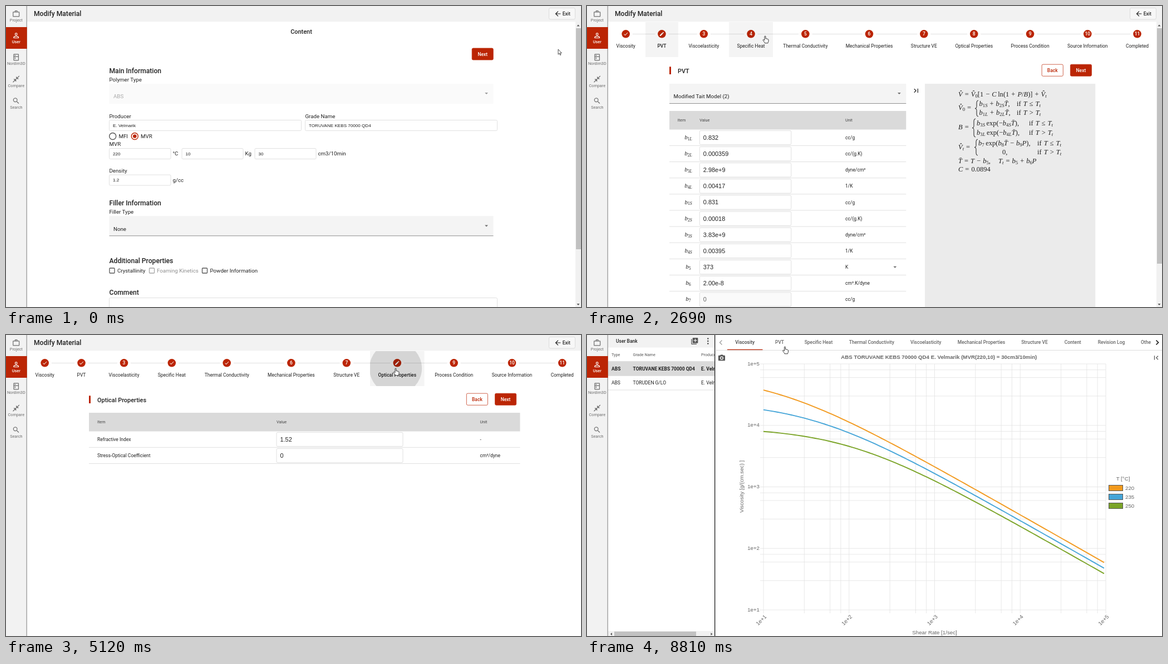
An HTML page for the animation above (8.89 s loop, 1033x542 px).

```html
<!DOCTYPE html>
<html lang="en">
<head>
<meta charset="utf-8">
<title>Modify Material</title>
<style>
html, body { margin: 0; width: 100%; height: 100%; overflow: hidden; background: #fff; }
svg { display: block; width: 1033px; height: 542px; }
text { font-family: Roboto, sans-serif; white-space: pre; }
.in { font-family: "Liberation Sans", Arial, sans-serif; }
.math { font-family: "Liberation Serif", "Noto Serif", serif; word-spacing: .9px; }
.i { font-style: italic; }
</style>
</head>
<body>
<svg id="stage" viewBox="0 0 1033 542"></svg>
<script>
const LOOP = 8890, RED = '#bb2504', INK = '#212121';
const GRADE = 'TORUVANE KEBS 70000 QD4', GRADE2 = 'TORUDEN G/LO', MAKER = 'E. Velmarik', DB = 'Other Material Database (Quolen 5.0)';

// the page is shown at this zoom; sizes below are page pixels times it
const Z = .607, F12 = 12 * Z, F14 = 14 * Z, F16 = 16 * Z, F18 = 18 * Z, F20 = 20 * Z;

const ICON = {
  work: 'M14 6V4h-4v2zM4 8v11h16V8zm16-2a2 2 0 0 1 2 2v11a2 2 0 0 1-2 2H4a2 2 0 0 1-2-2V8a2 2 0 0 1 2-2h4V4a2 2 0 0 1 2-2h4a2 2 0 0 1 2 2v2z',
  user: 'M12 5.9a2.1 2.1 0 1 1 0 4.2 2.1 2.1 0 0 1 0-4.2m0 9c2.97 0 6.1 1.46 6.1 2.1v1.1H5.9V17c0-.64 3.13-2.1 6.1-2.1M12 4a4 4 0 1 0 0 8 4 4 0 0 0 0-8zm0 9c-2.67 0-8 1.34-8 4v3h16v-3c0-2.66-5.33-4-8-4z',
  unit: 'M18 2H6a2 2 0 0 0-2 2v16a2 2 0 0 0 2 2h12a2 2 0 0 0 2-2V4a2 2 0 0 0-2-2zm0 18H6v-9h12zm0-11H6V4h12zM8 5h2v3H8zm0 7h2v5H8z',
  merge: 'M22 3.41 16.71 8.7 20 12h-8V4l3.29 3.29L20.59 2zM3.41 22l5.29-5.29L12 20v-8H4l3.29 3.29L2 20.59z',
  search: 'M15.5 14h-.79l-.28-.27A6.5 6.5 0 1 0 9.5 16c1.61 0 3.09-.59 4.23-1.57l.27.28v.79l5 5L20.5 19zm-6 0a4.5 4.5 0 1 1 0-9 4.5 4.5 0 0 1 0 9z',
  check: 'M9 16.2L4.8 12l-1.4 1.4L9 19 21 7l-1.4-1.4z',
  edit: 'M3 17.25V21h3.75L17.81 9.94l-3.75-3.75zM20.71 7.04a1 1 0 0 0 0-1.41l-2.34-2.34a1 1 0 0 0-1.41 0l-1.83 1.83 3.75 3.75z',
  back: 'M20 11H7.83l5.59-5.59L12 4l-8 8 8 8 1.41-1.41L7.83 13H20z',
  last: 'M5.59 7.41 10.18 12l-4.59 4.59L7 18l6-6-6-6zM16 6h2v12h-2z',
  first: 'M18.41 7.41 13.82 12l4.59 4.59L17 18l-6-6 6-6zM6 6h2v12H6z',
  add: 'M4 6H2v14a2 2 0 0 0 2 2h14v-2H4zm16-4H8a2 2 0 0 0-2 2v12a2 2 0 0 0 2 2h12a2 2 0 0 0 2-2V4a2 2 0 0 0-2-2zm-1 9h-4v4h-2v-4H9V9h4V5h2v4h4z',
  camera: 'M9 2 7.17 4H4a2 2 0 0 0-2 2v12a2 2 0 0 0 2 2h16a2 2 0 0 0 2-2V6a2 2 0 0 0-2-2h-3.17L15 2zm3 15a5 5 0 1 1 0-10 5 5 0 0 1 0 10zm0-8a3 3 0 1 0 0 6 3 3 0 0 0 0-6z'
};

// drawing helpers
const text = (x, y, s, size = F14, more = '', fill = INK) => `<text x="${x}" y="${y}" font-size="${size}" fill="${fill}" ${more}>${s}</text>`;
const rect = (x, y, w, h, fill, more = '') => `<rect x="${x}" y="${y}" width="${w}" height="${h}" fill="${fill}" ${more}/>`;
const path = (d, more) => `<path d="${d}" ${more}/>`;
const icon = (name, x, y, fill = INK, s = Z) => path(ICON[name], `fill="${fill}" fill-rule="evenodd" transform="translate(${x - 12 * s} ${y - 12 * s}) scale(${s})"`);
const MID = 'text-anchor="middle"', BOLD = 'font-weight="500"', BOLDMID = MID + ' ' + BOLD;
const caret = (x, y, fill = '#6b6b6b') => path(`M${x - 2.9} ${y - 1.4}h5.8l-2.9 3z`, `fill="${fill}"`);
const hline = (x0, x1, y, c = '#e0e0e0') => path(`M${x0} ${y}H${x1}`, `stroke="${c}"`);
const field = (x, y, w, h, s, size = 8.1, off = false) =>
  rect(x, y, w, h, off ? '#fafafa' : '#fff', 'rx="2" stroke="#e0e0e0"') +
  text(x + 6.5, y + h / 2 + size * .36, s, size, 'class="in"', off ? '#666' : INK);
const select = (x0, x1, y, s, off) =>
  rect(x0, y, x1 - x0, 36, off ? '#fafafa' : '#f4f4f4') + (off ? '' : hline(x0, x1, y + 35.5, '#8f8f8f')) +
  text(x0 + 7.5, y + 26.3, s, F16, '', off ? '#a8a8a8' : INK) + caret(x1 - 12.4, y + 17.5, off ? '#999' : '#6b6b6b');
const BTN_W = 64 * Z, BTN_H = 36 * Z;
const button = (x, y, s, solid) =>
  rect(x + .35, y + .35, BTN_W - .7, BTN_H - .7, solid ? RED : '#fff', `rx="2.2" stroke="${RED}" stroke-width=".7"`) +
  text(x + BTN_W / 2, y + BTN_H / 2 + 3, s, F14, BOLDMID, solid ? '#fff' : RED);
const scrollbar = end => rect(1023, 28, 10, 514, '#f1f1f1') + rect(1024, 40, 9, end - 40, '#c1c1c1') +
  path('M1025.5 36.5h5l-2.5-3zM1025.5 536h5l-2.5 3z', 'fill="#555"');

// _{..} lowers, ^{..} raises, quotes keep upright
function math(x, y, s, size = 12.5, more = '') {
  const slant = t => t.replace(/[A-Za-zα-ω][\u0302\u0304\u0307]?/gu, '<tspan class="i">$&</tspan>');
  let shift = 0, out = '';
  for (const m of s.matchAll(/([_^])\{(.*?)\}|"(.*?)"|([^_^"]+)/gu)) {
    const want = m[1] === '_' ? .17 : m[1] === '^' ? -.36 : 0;
    const body = m[1] ? slant(m[2]) : m[3] || slant(m[4]);
    out += `<tspan dy="${((want - shift) * size).toFixed(2)}" font-size="${m[1] ? size * .7 : size}">${body}</tspan>`;
    shift = want;
  }
  return text(x, y, out, size, `class="math" ${more}`);
}
const stroke = w => `fill="none" stroke="${INK}" stroke-width="${w}"`;
const brace = (x, y, h) => path(`M${x + 6} ${y}q-3 0-3 4v${h / 2 - 7}q0 3-3 3q3 0 3 3v${h / 2 - 7}q0 4 3 4`, stroke(1));
const parens = (x0, x1, y, h) => path(`M${x0} ${y}q-4.5 ${h / 2} 0 ${h}M${x1} ${y}q4.5 ${h / 2} 0 ${h}`, stroke(.9));

// stepper
const STEPS = ['Viscosity', 'PVT', 'Viscoelasticity', 'Specific Heat', 'Thermal Conductivity', 'Mechanical Properties',
  'Structure VE', 'Optical Properties', 'Process Condition', 'Source Information', 'Completed'];
const CX = [69.7, 135.5, 212, 297.8, 396.7, 512.4, 611.8, 702.8, 804.7, 909, 999.3];
const CW = [64, 59, 85, 79, 109, 114.5, 76.3, 97.5, 99, 101.5, 69];
const stepX = (i, narrow) => CX[i] - (narrow ? 1.08 * i : 0);

function stepper(cur, seen, narrow) {
  const gap = 20 * Z;
  return STEPS.map((name, i) => {
    const x = stepX(i, narrow), on = i === cur;
    const mark = on ? icon('edit', x, 50.3, '#fff', 16 / 24 * Z) : seen.includes(i) ? icon('check', x, 50.3, '#fff', 16 / 24 * Z)
      : text(x, 53.3, i + 1, F14, BOLDMID, '#fff');
    return (i ? hline(stepX(i - 1, narrow) + gap, x - gap, 50.5) : '') +
      `<circle cx="${x}" cy="50.3" r="${12 * Z}" fill="${RED}"/>` + mark +
      text(x, 75.4, name, F14, on ? BOLDMID : MID);
  }).join('');
}

function table(x0, x1, y, c, rows) {
  const head = (x, s) => text(x, y + 19.2, s, F12, '', '#444');
  let s = rect(x0, y, x1 - x0, 33.5, '#dadada') + head(c.item, 'Item') + head(c.val, 'Value') + (c.unit ? head(c.unit, 'Unit') : '');
  rows.forEach(([name, value, unit, kind], i) => {
    const cy = y + 48 + i * 48 * Z;
    s += hline(x0, x1, cy + 14.4) + (c.sym ? math(c.sym, cy + 3, name, 11, MID) : text(c.item, cy + 3, name)) +
      field(c.val, cy - 12.6, c.w, 25.2, value, F18, kind === 'off') +
      (c.unit ? text(c.unit, cy + 3, unit) : '') + (kind === 'list' ? caret(x1 - 20, cy) : '');
  });
  return s;
}

const titleBar = (name, narrow) => {
  const x0 = narrow ? 148 : 149, x1 = narrow ? 913.3 : 923.5;
  return rect(x0, 109.3, 3, 13.7, RED) + text(x0 + 15, 120.5, name, F18, BOLD) +
    button(x1 - 96.5, 104.8, 'Back') + button(x1 - 45.3, 104.8, 'Next', true);
};
// select and table on the left, formula panel on the right
function modelPage(name, model, c, rows, bottom, formulas, narrow) {
  const [x0, x1, p0, p1] = narrow ? [148, 573.3, 607, 913.3] : [149, 583.5, 614, 923.5];
  return titleBar(name, narrow) + select(x0, x1, 140, model) + icon('last', x1 + 18, 152.5) +
    table(x0, x1, 189, c, rows) + rect(p0, 140, p1 - p0, bottom - 140, '#ebebeb') + formulas;
}
const tablePage = (name, c, rows) => titleBar(name) + table(149, 923.5, 140, { item: 164, ...c }, rows);

// fixed parts
const sidebar = () => {
  const items = [['work', 'Project'], ['user', 'User'], ['unit', 'Nordim3D'], ['merge', 'Compare'], ['search', 'Search']];
  return rect(0, 0, 38, 542, '#f2f2f2') + rect(35.5, 0, 2.5, 542, 'url(#edge)') + rect(0, 38, 37.7, 39, RED) +
    items.map(([pic, name], i) => {
      const c = i === 1 ? '#fff' : '#6e6e6e', y = 14 + i * 39.2;
      return icon(pic, 18.2, y, c) + text(18.3, y + 14, name, F12, i === 1 ? BOLDMID : MID, c);
    }).join('');
};
const topBar = () => rect(38, 0, 995, 28.4, '#f2f2f2') + text(50, 18, 'Modify Material', F20, BOLD) +
  rect(975.5, 3.5, 47, 20.5, '#f7f7f7', 'rx="2.5" stroke="#dcdcdc"') + icon('back', 991.5, 14) + text(999.8, 16.8, 'Exit', F14, BOLD);

function contentPage() {
  const head = (y, s) => text(185.5, y, s, F20, BOLD), lab = (x, y, s, c) => text(x, y, s, F16, '', c);
  const box = (x, c) => rect(x, 472, 9, 9, '#fff', `rx="1" stroke="${c}" stroke-width="1.3"`);
  const ring = (x, c) => `<circle cx="${x}" cy="234.5" r="6" fill="#fff" stroke="${c}" stroke-width="1.4"/>`;
  return text(530.5, 50, 'Content', F18, BOLDMID) + button(836.8, 75.6, 'Next', true) +
    head(121, 'Main Information') + lab(185.5, 136.4, 'Polymer Type') + select(185.5, 875.5, 140, 'ABS', true) +
    lab(185.5, 202, 'Producer') + lab(537.5, 202, 'Grade Name') +
    field(185.5, 205.5, 345, 19, MAKER) + field(537.5, 205.5, 345, 19, GRADE) +
    ring(191.7, '#555') + ring(231.3, RED) + `<circle cx="231.3" cy="234.5" r="3.3" fill="${RED}"/>` +
    lab(202.5, 238, 'MFI') + lab(242, 238, 'MVR') + lab(185.5, 252.3, 'MVR') +
    field(185.5, 256.5, 110.5, 19, '220') + lab(299.5, 269.3, '°C') + field(316, 256.5, 110, 19, '10') + lab(429.5, 269.3, 'Kg') +
    field(447, 256.5, 110, 19, '30') + lab(560.5, 269.3, 'cm3/10min') +
    lab(185.5, 300, 'Density') + field(185.5, 304, 110.5, 19, '1.2') + lab(299.5, 317, 'g/cc') +
    head(359, 'Filler Information') + lab(185.5, 374.3, 'Filler Type') + select(185.5, 875.5, 378.3, 'None') +
    head(463, 'Additional Properties') + box(186, '#555') + lab(200, 479.7, 'Crystallinity') +
    box(257.5, '#a5a5a5') + lab(271, 479.7, 'Foaming Kinetics', '#8e8e8e') + box(352.5, '#555') + lab(366.5, 479.7, 'Powder Information') +
    head(519.5, 'Comment') + rect(185.5, 525.5, 697, 40, '#fff', 'rx="2" stroke="#e0e0e0"') + scrollbar(438);
}

const viscosityMath = () => math(711.5, 161, 'η =') + hline(734.5, 781.5, 158.5, INK) + math(757.5, 155.5, 'η_{0}', 8.8, MID) +
  math(735, 170.5, '1+', 8.8) + parens(749.5, 765, 160, 16) + hline(751.5, 763, 168.5, INK) +
  math(757.3, 166.5, 'η_{0}γ\u0307', 6.6, MID) + math(757.3, 174.5, 'τ^{*}', 6.6, MID) + math(768, 163, '1−n', 6.6) +
  math(711.5, 192, 'η_{0} = B "exp"') + parens(773, 820.5, 178.5, 20) + hline(775.5, 785, 188.5, INK) +
  math(780, 186, 'T_{b}', 8.4, MID) + math(780, 197, 'T', 8.4, MID) + math(788.5, 192, '+ DP');

function pvtMath() {
  const V = 'V\u0302', T = 'T\u0304', when = (x, y, op) => math(x, y, `"if" T ${op} T_{t}`);
  return math(667, 163, `${V} = ${V}_{0}[1 − C\u2009"ln"(1 + P/B)] + ${V}_{t}`) +
    math(667, 187, `${V}_{0} =`) + brace(697, 170, 29) +
    math(704.5, 180, `b_{1S} + b_{2S}${T},`) + when(772, 180, '≤') + math(704.5, 196, `b_{1L} + b_{2L}${T},`) + when(772, 196, '>') +
    math(667, 222, 'B =') + brace(692, 203, 33) +
    math(700, 214.5, `b_{3S}\u2009"exp"(−b_{4S}${T}),`) + when(794, 214.5, '≤') + math(700, 232, `b_{3L}\u2009"exp"(−b_{4L}${T}),`) + when(794, 232, '>') +
    math(667, 258, `${V}_{t} =`) + brace(696, 240, 29) +
    math(703, 250.5, `b_{7}\u2009"exp"(b_{8}${T} − b_{9}P),`) + when(809, 250.5, '≤') + math(746, 267, '0,') + when(809, 267, '>') +
    math(667, 283, `${T} = T − b_{5},`) + math(739, 283, 'T_{t} = b_{5} + b_{6}P') + math(667, 298, 'C = 0.0894');
}

// result view
function bankPage() {
  const clip = s => `<g clip-path="url(#bank)">${s}</g>`;
  const row = (y, type, grade, maker, size, more, c) => text(44, y, type, size, more, c) + text(82.5, y, grade, size, more, c) + text(205, y, maker, size, more, c);
  const tabs = [['Viscosity', 283.7], ['PVT', 346], ['Specific Heat', 416], ['Thermal Conductivity', 511.3], ['Viscoelasticity', 608.7],
    ['Mechanical Properties', 708.5], ['Structure VE', 804], ['Content', 872.7], ['Revision Log', 942]];
  return rect(38, 0, 995, 542, '#fff') + rect(38, 0, 191, 22.5, '#f2f2f2') + text(52, 14, 'User Bank', F14, BOLD) +
    icon('add', 193.3, 11, '#555') + [6.5, 11, 15.5].map(y => `<circle cx="217.3" cy="${y}" r="1.3" fill="#444"/>`).join('') +
    rect(38, 48, 191, 25.5, '#dadada') + hline(38, 229, 47.5) + hline(38, 229, 73.5) + hline(38, 229, 99) +
    clip(row(38, 'Type', 'Grade Name', 'Producer', F12, '', '#555') + row(64, 'ABS', GRADE, MAKER, F14, 'font-weight="700"') + row(89, 'ABS', GRADE2, MAKER, F14)) +
    rect(38, 533, 191, 9, '#f1f1f1') + rect(49, 534, 147, 8, '#c1c1c1') + path('M45 536v5l-3-2.5zM222.5 536v5l3-2.5z', 'fill="#555"') +
    rect(229, 0, 1.3, 542, '#1c1c1c') + hline(230, 1033, 27.5, '#ddd') +
    tabs.map(([s, x], i) => text(x, 16.2, s, F14, BOLDMID, i ? '#666' : '#444')).join('') + text(995, 16.2, 'Othe', F14, BOLD, '#666') +
    rect(252, 25.8, 63.5, 2 * Z, RED) + rect(1013, 0, 20, 27, '#fff') +
    path('M242.5 9.5l-4 4 4 4', 'fill="none" stroke="#999" stroke-width="1.2"') + path('M1022.5 9.5l4 4-4 4', 'fill="none" stroke="#111" stroke-width="1.6"') +
    icon('camera', 242, 41.5, '#555') + icon('first', 1022.5, 41, '#555');
}

function chart() {
  const L = 317, TOP = 52, BOT = 495, DX = 153.75, DY = (BOT - TOP) / 4, grey = '#666';
  const lab = (x, y, s, more = '') => text(x, y, s, F16, 'class="in" ' + more, grey);
  let grid = '', s = '';
  for (let d = 0; d <= 4; d++) {
    for (const m of d < 4 ? [1, 3, 6, 8] : [1]) {
      const k = d + Math.log10(m);
      grid += `M${L + k * DX} ${TOP}V${BOT + 6}M${L - 6} ${BOT - k * DY}H${L + 4 * DX}`;
    }
    const x = L + d * DX + 6;
    s += lab(310, BOT - d * DY + 2.7, '1e+' + (d + 1), 'text-anchor="end"') +
      lab(x, 508, '1e+' + (d + 1), `text-anchor="end" transform="rotate(-45 ${x} 508)"`);
  }
  s = path(grid, 'stroke="#e3e3e3" stroke-width=".8"') + s;
  [[220, '#f29a1f'], [235, '#45a5d8'], [250, '#7ba428']].forEach(([temp, c], i) => {
    const eta0 = 5.92e-11 * Math.exp(17100 / (temp + 273.15)), pts = [];
    for (let k = 0; k <= 3.981; k += .0398) {
      const eta = eta0 / (1 + (eta0 * 10 ** (k + 1) / 8.88e5) ** .792);
      pts.push((L + k * DX).toFixed(2) + ' ' + (BOT - (Math.log10(eta) - 1) * DY).toFixed(2));
    }
    s += path('M' + pts.join('L'), `fill="none" stroke="${c}" stroke-width="1.9"`) +
      rect(937.5, 270.5 + i * 16, 25, 10, c, 'stroke="#555"') + lab(967, 279 + i * 16, temp);
  });
  return s + text(632.3, 43, `ABS ${GRADE} ${MAKER} (MVR(220,10) = 30cm3/10min)`, F16, `class="in" ${MID} font-weight="700"`, grey) +
    lab(963, 261.5, 'T [°C]', MID) + lab(624.5, 538.5, 'Shear Rate [1/sec]', MID) +
    lab(281, 273, 'Viscosity [g/(cm.sec) ]', MID + ' transform="rotate(-90 281 273)"');
}

const PVT = [['1L', '0.832', 'cc/g'], ['2L', '0.000359', 'cc/(g.K)'], ['3L', '2.98e+9', 'dyne/cm²'], ['4L', '0.00417', '1/K'],
  ['1S', '0.831', 'cc/g'], ['2S', '0.00018', 'cc/(g.K)'], ['3S', '3.83e+9', 'dyne/cm²'], ['4S', '0.00395', '1/K'],
  ['5', '373', 'K', 'list'], ['6', '2.00e-8', 'cm².K/dyne'], ['7', '0', 'cc/g', 'off']].map(([k, ...r]) => [`b_{${k}}`, ...r]);
const CONST = { item: 164, sym: 187, val: 210, w: 171, unit: 483 };
const PROCESS = [['Melt Temperature (Minimum)', '220'], ['Melt Temperature (Normal)', '235'], ['Melt Temperature (Maximum)', '250'],
  ['Mold Temperature (Minimum)', '40'], ['Mold Temperature (Normal)', '50'], ['Mold Temperature (Maximum)', '60'],
  ['Ejection Temperature', '99.85000000000002'], ['Freeze Temperature', '119.85']].map(r => [...r, '°C']);
const SOURCES = [DB, 'Generic Default', 'Others', 'Generic Default', 'Generic Default', DB, 'Generic (2148)', 'Others', DB];

// scenes: start time, current step, body
const SCENES = [
  [0, -1, contentPage()],
  [940, 0, modelPage('Viscosity', 'Modified Cross Model (2)', { item: 164, sym: 184.3, val: 205.5, w: 168.5, unit: 475.5 },
    [['n', '0.208', '-'], ['τ^{*}', '8.88e+5', 'dyne/cm²'], ['B', '5.92e-11', 'g/(cm.sec)'], ['T_{b}', '17100', 'K', 'list'], ['D', '0', 'cm²/dyne']], 380, viscosityMath())],
  [2220, 1, modelPage('PVT', 'Modified Tait Model (2)', { item: 162.7, sym: 182, val: 202.3, w: 164.5, unit: 464 }, PVT, 542, pvtMath(), true) + scrollbar(464)],
  [2980, 3, modelPage('Specific Heat', 'Constant Cp', CONST, [['C_{P0}', '2.40e+7', 'erg/(g.°C)']], 264, math(768.7, 161, 'C_{P}=C_{P0}', 12.5, MID))],
  [4110, 4, modelPage('Thermal Conductivity', 'Constant K', CONST, [['K_{0}', '1.80e+4', 'erg/(sec.cm.°C)']], 264, math(768.7, 161, 'K=K_{0}', 12.5, MID))],
  [5060, 7, tablePage('Optical Properties', { val: 486, w: 227, unit: 851.5 }, [['Refractive Index', '1.52', '-'], ['Stress-Optical Coefficient', '0', 'cm²/dyne']])],
  [6000, 8, tablePage('Process Condition', { val: 486, w: 227, unit: 851.5 }, PROCESS)],
  [6740, 9, tablePage('Source Information', { val: 451.5, w: 281.5 }, SOURCES.map((v, i) => [STEPS[i], v]))],
  [7600, -1, bankPage()],
  [7820, -1, bankPage() + chart()]
];
const BANK = 8;
const order = SCENES.map(s => s[1]);

// pointer track: time, x, y
const TRACK = [[0, 992, 78], [70, 992, 78], [640, 858, 92], [1230, 858, 92], [1340, 835, 110], [1620, 230, 97], [1690, 91.5, 79],
  [1780, 91.5, 79], [2040, 137, 60], [2280, 137, 60], [2640, 320, 54], [3100, 320, 54], [3740, 402, 51], [3860, 403, 50],
  [4260, 403, 50], [4790, 700, 60], [5250, 700, 60], [5840, 812, 66], [6180, 824, 68], [6290, 824, 68], [6480, 900, 66],
  [6840, 900, 66], [7140, 995, 67], [7599, 995, 67], [7600, 887, 122], [8110, 887, 122], [8780, 355.5, 21], [8890, 355.5, 21]];
const CLICKS = [690, 2110, 2890, 4000, 4970, 5920, 6660, 7330];

function pointer(t) {
  const i = Math.max(1, TRACK.findIndex(k => k[0] > t));
  const [t0, x0, y0] = TRACK[i - 1], [t1, x1, y1] = TRACK[i];
  const u = Math.min(1, Math.max(0, (t - t0) / (t1 - t0))), e = u * u * (3 - 2 * u);
  return [x0 + (x1 - x0) * e, y0 + (y1 - y0) * e];
}
const stepAt = ([x, y], narrow) => y < 29 || y > 92 ? -1 : CX.findIndex((_, i) => Math.abs(x - stepX(i, narrow)) <= CW[i] / 2);
const stepBox = (i, narrow) => [stepX(i, narrow) - CW[i] / 2, 29, CW[i], 63];
const inside = ([x, y], x0, y0, x1, y1) => x >= x0 && x <= x1 && y >= y0 && y <= y1;

const ARROW = path('M0 0V9.2L2.1 7.2 3.6 10.5 5 9.9 3.5 6.7H6.3Z', 'fill="#fff" stroke="#222" stroke-width=".8"');
const HAND = path('M-1 1C-1-.3 1-.3 1 1V5C1.2 4.2 2.7 4.3 2.7 5.4 3.1 4.7 4.3 4.9 4.4 6 4.8 5.4 6 5.7 6 6.8V9C6 11 5 11.3 5 12.8H-.6C-.8 11-3 9.2-3.7 7.8-4.4 6.4-2.6 5.8-1 7.8Z',
  'fill="#fff" stroke="#222" stroke-width=".9" stroke-linejoin="round"');

const stage = document.getElementById('stage');
stage.innerHTML = `<defs><linearGradient id="edge"><stop offset="0" stop-opacity="0"/><stop offset="1" stop-opacity=".4"/></linearGradient>
  <clipPath id="bank"><rect x="38" y="0" width="191" height="542"/></clipPath></defs>` +
  rect(0, 0, 1033, 542, '#fff') + SCENES.map(([, cur, body], i) =>
    `<g class="scene">${i < BANK ? topBar() : ''}${cur < 0 ? '' : stepper(cur, order.slice(0, i), cur === 1)}${body}</g>`).join('') +
  sidebar() + '<g id="fx"></g><g id="cursor"></g>';
const groups = stage.querySelectorAll('.scene'), fx = document.getElementById('fx'), cursor = document.getElementById('cursor');

function render(t) {
  const now = SCENES.findLastIndex(s => s[0] <= t), p = pointer(t);
  const cur = order[now], narrow = cur === 1;
  groups.forEach((g, i) => g.setAttribute('display', i === now ? 'inline' : 'none'));

  let s = '';
  if (cur >= 0) {
    const over = new Set([stepAt(pointer(t - 70), narrow)]);
    if (narrow) over.add(1);
    for (const i of over) if (i >= 0) s += rect(...stepBox(i, narrow), '#000', 'opacity=".045"');
  }
  const click = CLICKS.findLast(c => c <= t), age = t - click;
  if (age < 420 && now < BANK) {
    const [x, y] = pointer(click), step = stepAt([x, y], narrow);
    const box = cur < 0 ? [836.8, 75.6, BTN_W, BTN_H] : step >= 0 ? stepBox(step, narrow) : null;
    const fade = Math.min(1, (420 - age) / 180);
    if (box) s += `<clipPath id="tap">${rect(...box, '#000')}</clipPath><circle cx="${x}" cy="${y}" r="${70 * (1 - Math.exp(-.0074 * age))}"
      fill="${cur < 0 ? '#fff' : '#000'}" opacity="${.13 * fade}" clip-path="url(#tap)"/>`;
    if (age < 110) s += `<circle cx="${x}" cy="${y + 3}" r="7.5" fill="#ffe11e" opacity=".7"/>`;
  }
  fx.innerHTML = s;

  const hand = now === 0 ? inside(p, 837, 75, 876, 98) : now >= BANK ? p[1] < 27
    : stepAt(p, narrow) >= 0 || inside(p, 827, 104, 866, 127) || inside(p, 878, 104, 917, 127);
  cursor.innerHTML = hand ? HAND : ARROW;
  cursor.setAttribute('transform', `translate(${p[0].toFixed(2)} ${p[1].toFixed(2)})`);
}

const start = performance.now();
function tick() {
  render((performance.now() - start) % LOOP);
  requestAnimationFrame(tick);
}
tick();
</script>
</body>
</html>
```
